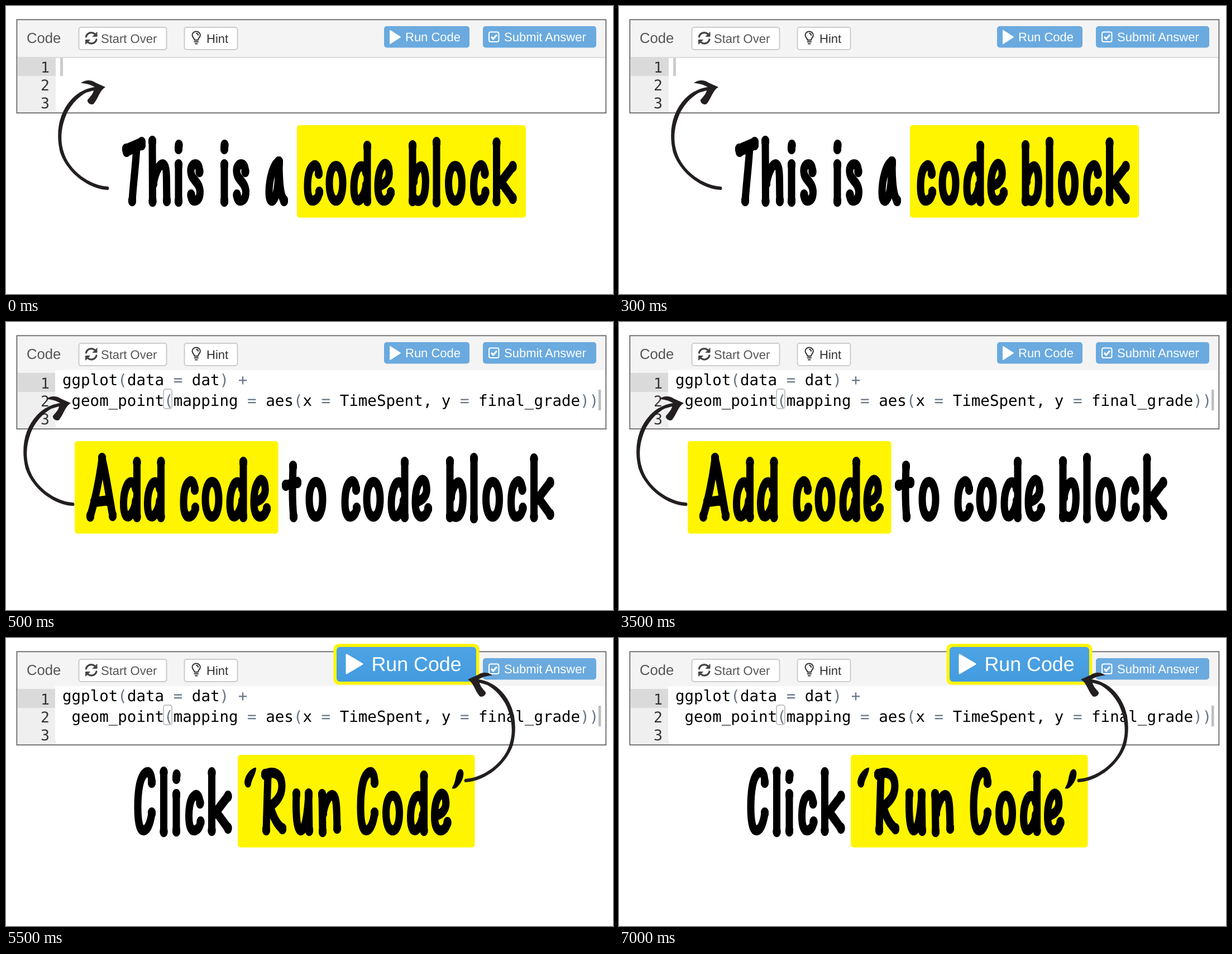
Recreate the animation shown at these times as an HTML page. Size 1087 by 515 pixels, loop 8000 ms.

```html
<!DOCTYPE html>
<html lang="en">
<head>
<meta charset="utf-8">
<title>Code block steps</title>
<style>
  html, body { margin: 0; width: 100%; height: 100%; overflow: hidden; background: #fff; }
  svg { display: block; width: 1087px; height: 515px; }
  text { font: 22px "Liberation Sans", Arial, sans-serif; text-rendering: geometricPrecision; }
  .mono text { font: 27.5px "DejaVu Sans Mono", monospace; white-space: pre; }
  .mono tspan { fill: #687687; }
  .num text { font-size: 26.5px; fill: #333; text-anchor: middle; }
  .line { fill: none; stroke-linecap: round; stroke-linejoin: round; }
  .hl { fill: #fff500; }

  .pen path { fill: none; stroke: #000; stroke-width: 13; stroke-linecap: round; stroke-linejoin: round;
    marker-start: url(#bulb); marker-end: url(#bulb); }
  .pen path[d$="Z"] { marker: none; }
  .pen path.solid { fill: #000; stroke-width: 2; marker: none; }

  .s1, .s2, .s3, .code { visibility: hidden; animation: 8s step-end infinite; }
  .s1 { animation-name: first; }
  .s2 { animation-name: second; }
  .s3 { animation-name: third; }
  .code { animation-name: typed; }
  @keyframes first { 0% { visibility: visible; } 6.25%, 100% { visibility: hidden; } }
  @keyframes second { 0% { visibility: hidden; } 6.25% { visibility: visible; } 68.75%, 100% { visibility: hidden; } }
  @keyframes third { 0% { visibility: hidden; } 68.75%, 100% { visibility: visible; } }
  @keyframes typed { 0% { visibility: hidden; } 6.25%, 100% { visibility: visible; } }
</style>
</head>
<body>
<svg viewBox="0 0 1087 515" xmlns="http://www.w3.org/2000/svg">
  <defs>
    <marker id="bulb" viewBox="-1 -1 2 2" markerWidth="1.12" markerHeight="1.12"><circle r="1"/></marker>
    <linearGradient id="blue" x2="0" y2="1">
      <stop stop-color="#4da3e4"/><stop offset="1" stop-color="#439bdf"/>
    </linearGradient>
    <g id="arrow" fill="#231f20">
      <path d="M183 329C150 328 110 300 97 262C88 225 95 190 118 166C130 154 142 148 158 145L158 149C140 154 124 166 111 188C99 212 96 238 103 260C113 295 150 321 183 323Q186 326 183 329Z"/>
      <path d="M134 138C141 132 152 131 160 137L178 145C167 152 166 164 157 175C152 178 145 173 146 168C151 162 156 157 157 151L143 155C147 150 152 147 159 145C150 140 142 138 134 138Z"/>
    </g>
  </defs>

  <!-- editor panel -->
  <rect x="20" y="25" width="1054" height="66" fill="#f4f4f4"/>
  <rect x="20" y="91" width="1054" height="2" fill="#dcdcdc"/>
  <rect x="21" y="93" width="68" height="97" fill="#efefef"/>
  <rect x="21" y="92" width="68" height="33" fill="#dadada"/>
  <g class="code"><rect x="88" y="86" width="985" height="96" fill="#fff"/></g>
  <rect x="19.400" y="24.400" width="1055" height="166.800" fill="none" stroke="#666" stroke-width="1.800"/>

  <text x="37" y="66" style="font-size:25.7px" fill="#555">Code</text>
  <g fill="#fff" stroke="#ccc" stroke-width="2">
    <rect x="130.500" y="38" width="157" height="40" rx="4"/>
    <rect x="319.500" y="38" width="95" height="40" rx="4"/>
  </g>
  <text x="170" y="66" fill="#555">Start Over</text>
  <text x="359" y="66" fill="#333">Hint</text>
  <g class="line" stroke="#444" stroke-width="3.200" stroke-linecap="butt">
    <path d="M143.500 55A9.500 9.500 0 0 1 159 50M162 60A9.500 9.500 0 0 1 147 65"/>
    <path d="M163 47V54.500H155.500ZM142.500 68V60.500H150Z" fill="#444" stroke-width="1"/>
  </g>
  <g class="line" stroke="#333" stroke-width="2">
    <path d="M337.500 61C337 57 333.500 56 333.500 52A7.200 6.500 0 0 1 347.900 52C347.900 56 344.400 57 343.900 61ZM337.500 64H344M339 67.500H342.500M341 49Q344 49 344 52"/>
  </g>
  <g fill="#6aaadf">
    <rect x="677" y="36" width="153" height="38.500" rx="5"/>
    <rect x="854" y="36" width="203" height="38.500" rx="5"/>
  </g>
  <g fill="#fff">
    <path d="M688 44V67L706 55.500Z" stroke="#fff" stroke-width="2" stroke-linejoin="round"/>
    <text x="715" y="63">Run Code</text>
    <text x="892" y="63">Submit Answer</text>
  </g>
  <g class="line" stroke="#fff" stroke-width="2">
    <rect x="865" y="46.500" width="17.500" height="17.500" rx="3"/>
    <path d="M869 55L872.500 59L879 51.500" stroke-width="3" stroke-linecap="butt" stroke-linejoin="miter"/>
  </g>

  <!-- editor text -->
  <g class="mono num">
    <text x="70" y="118.500">1</text><text x="70" y="150.500">2</text><text x="70" y="183">3</text>
  </g>
  <g class="s1"><rect x="97" y="93" width="5" height="32" fill="#ccc"/></g>
  <g class="mono code">
    <rect x="282" y="120" width="15" height="35" rx="4" fill="none" stroke="#c4c4c4" stroke-width="2"/>
    <text x="101" y="113">ggplot<tspan>(</tspan>data <tspan>=</tspan> dat<tspan>)</tspan> <tspan>+</tspan></text>
    <text x="117.500" y="150">geom_point<tspan>(</tspan>mapping <tspan>=</tspan> aes<tspan>(</tspan>x <tspan>=</tspan> TimeSpent, y <tspan>=</tspan> final_grade<tspan>))</tspan></text>
    <rect x="1061" y="121" width="4.500" height="37" fill="#bdbdbd"/>
  </g>

  <!-- captions -->
  <g class="s1">
    <rect class="hl" x="521" y="213" width="410" height="165.500" rx="5"/>
    <g class="pen" data-y="357" data-words="This 207 is 384 a 464 code 533 block 721" role="img" aria-label="This is a code block"></g>
    <use href="#arrow"/>
  </g>
  <g class="s2">
    <rect class="hl" x="123" y="213" width="364.500" height="165.500" rx="5"/>
    <g class="pen" data-y="357" data-words="Add 144 code 311 to 494 code 600 block 788" role="img" aria-label="Add code to code block"></g>
    <use href="#arrow" x="-62"/>
  </g>
  <g class="s3">
    <rect class="hl" x="586.500" y="10.500" width="261" height="73" rx="9"/>
    <rect x="592" y="16" width="250" height="62" rx="6" fill="url(#blue)"/>
    <path d="M610 30V63L638 46.500Z" fill="#fff" stroke="#fff" stroke-width="3" stroke-linejoin="round"/>
    <text x="654.500" y="59" style="font-size:35.8px" fill="#fff">Run Code</text>
    <rect class="hl" x="415" y="209" width="424.500" height="165.500" rx="5"/>
    <g class="pen" data-y="353" data-words="Click 228 ‘Run 428 Code’ 627" role="img" aria-label="Click ‘Run Code’"></g>
    <use href="#arrow" transform="matrix(-1 0 0 1 1005 -71)"/>
  </g>
</svg>
<script>
  // Marker lettering: advance, then pen strokes as x y pairs above the baseline.
  const GLYPHS = {
    T: [49, 'M8 -101L36 -113', 'M9 -97L36 -109', 'M27 -104C25 -70 21 -40 19 -9'],
    h: [46, 'M6 -115L6.5 -8', 'M8 -40C12 -62 20 -78 27 -73C33 -68 31 -40 32 -9'],
    i: [22.5, 'M7.5 -108L7 -102', 'M7 -73L7 -8'],
    s: [36, 'M22 -61C22 -70 19 -74 15 -74C8 -74 5 -66 7 -57C9 -46 22 -42 23 -25C23 -12 18 -9 13 -9C9 -9 7 -13 7 -19'],
    a: [42, 'M24 -78C14 -74 7 -45 7 -24C7 -6 14 -4 19 -18C23 -30 24 -50 25 -76', 'M25 -78C25 -50 26 -20 34 -9'],
    c: [40, 'M27 -58C26 -72 21 -74 17 -71C9 -66 7 -48 7 -34C7 -16 11 -9 16 -9C23 -9 27 -16 28 -24'],
    o: [44, 'M18 -71C26 -71 30 -56 30 -40C30 -24 26 -9 18 -9C10 -9 6 -24 6 -40C6 -56 10 -71 18 -71Z'],
    d: [43, 'M30 -106L30 -9', 'M28 -60C24 -73 16 -74 11 -62C5 -48 4 -20 10 -11C17 -4 25 -20 28 -36'],
    e: [38.5, 'M9 -36C20 -38 28 -48 26 -62C25 -75 18 -78 14 -71C8 -63 6 -48 6 -34C6 -14 12 -9 17 -9C23 -9 27 -14 29 -23'],
    b: [43, 'M7 -107L7 -9', 'M9 -44C12 -64 20 -74 25 -69C33 -60 31 -24 26 -15C21 -5 13 -8 8 -14'],
    l: [22.5, 'M7 -113L7 -7'],
    k: [45, 'M8 -112L8 -9', 'M37 -70L14 -40', 'M16 -42L37 -13'],
    t: [43, 'M20 -99C19 -70 18 -40 21 -9', 'M7 -65L28 -70'],
    A: [60.5, 'M28 -113C24 -80 16 -40 7 -10', 'M28 -113C34 -90 40 -50 47 -11', 'M14 -35L38 -38'],
    C: [47.5, 'M33 -95C33 -110 28 -116 22 -112C11 -105 8 -75 8 -50C8 -22 12 -9 18 -9C26 -9 31 -24 33 -40'],
    R: [56, 'M12 -107L9 -10', 'M7 -109C22 -116 37 -111 37 -88C37 -68 24 -58 14 -50', 'M16 -52C22 -30 30 -18 38 -12'],
    u: [45, 'M7 -74C6 -50 6 -9 15 -9C23 -9 27 -40 29 -72', 'M29 -74L30 -9'],
    n: [48, 'M8 -73L9 -7', 'M10 -40C14 -62 22 -76 29 -71C35 -65 34 -40 35 -13'],
    '‘': [29, 'M19 -120C10 -118 0 -106 0 -94C1 -86 9 -84 10 -92C11 -102 18 -108 19 -120Z'],
    '’': [20, 'M15 -117C20 -115 19 -104 14 -96C9 -88 4 -84 0 -85C6 -94 5 -100 8 -110C10 -116 12 -118 15 -117Z']
  };
  const TALL = 1.4; // the pen is taller than wide
  const NS = 'http://www.w3.org/2000/svg';

  function add(parent, tag, attrs) {
    const el = document.createElementNS(NS, tag);
    for (const key in attrs) el.setAttribute(key, attrs[key]);
    return parent.appendChild(el);
  }

  function letter(group, char, x, y) {
    const [advance, ...strokes] = GLYPHS[char];
    const glyph = add(group, 'g', { transform: `translate(${x} ${y}) scale(1 ${TALL})` });
    for (const stroke of strokes) {
      const d = stroke.replace(/(-?[\d.]+) (-?[\d.]+)/g, (_, px, py) => `${px} ${(py / TALL).toFixed(2)}`);
      add(glyph, 'path', { d, class: '‘’'.includes(char) ? 'solid' : '' });
    }
    return x + advance;
  }

  for (const group of document.querySelectorAll('.pen')) {
    const { words, y } = group.dataset;
    for (const [, word, start] of words.matchAll(/(\S+) (\d+)/g)) {
      let x = +start;
      for (const char of word) x = letter(group, char, x, y);
    }
  }
</script>
</body>
</html>
```
